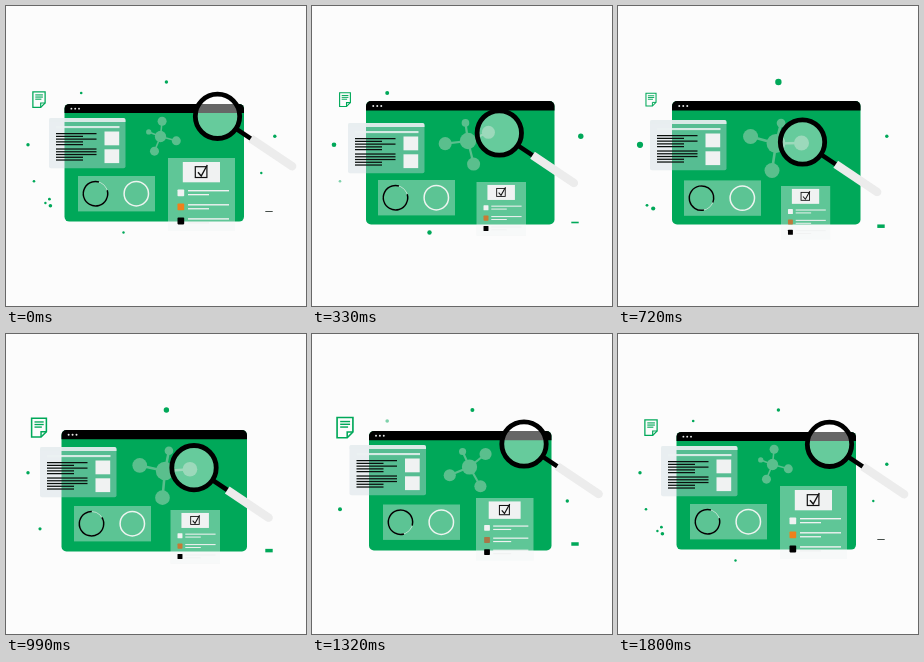
An HTML page with a canvas for the animation above (1830 ms loop, 300 by 300 pixels).

```html
<!DOCTYPE html>
<html lang="en">
<head>
<meta charset="utf-8">
<title>Research dashboard</title>
<style>
html, body { margin: 0; width: 100%; height: 100%; overflow: hidden; background: #fcfcfc; }
canvas { display: block; width: 300px; height: 300px; }
</style>
</head>
<body>
<canvas id="stage"></canvas>
<script>
const LOOP = 1830, STEP = 30;
const TIMES = [0, 330, 720, 990, 1320, 1560, 1800];
const GREEN = '#00a859', PALE = '#f0f2f2';
const canvas = document.getElementById('stage');
const c = canvas.getContext('2d');
const dpr = window.devicePixelRatio || 1;
canvas.width = canvas.height = 300 * dpr;

let now = 0;

// Monotone cubic through six poses; the first pose also closes the loop.
function key(...v) {
  v.push(v[0]);
  const last = TIMES.length - 1;
  if (now >= TIMES[last]) return v[last];
  let i = 0;
  while (now >= TIMES[i + 1]) i++;
  const rise = k => (v[k + 1] - v[k]) / (TIMES[k + 1] - TIMES[k]);
  const slope = k => {
    if (k === 0 || k === last) return 0;
    const a = rise(k - 1), b = rise(k);
    return a * b <= 0 ? 0 : 2 * a * b / (a + b);
  };
  const h = TIMES[i + 1] - TIMES[i], u = (now - TIMES[i]) / h;
  const u2 = u * u, u3 = u2 * u;
  return v[i] * (2 * u3 - 3 * u2 + 1) + v[i + 1] * (3 * u2 - 2 * u3)
    + h * (slope(i) * (u3 - 2 * u2 + u) + slope(i + 1) * (u3 - u2));
}

function rect(x, y, w, h, fill) {
  c.fillStyle = fill;
  c.fillRect(x, y, w, h);
}

function disc(x, y, r, fill) {
  if (r <= 0.05) return;
  c.fillStyle = fill;
  c.beginPath();
  c.arc(x, y, r, 0, Math.PI * 2);
  c.fill();
}

function ring(x, y, r, width, color, from = 0, to = Math.PI * 2) {
  c.strokeStyle = color;
  c.lineWidth = width;
  c.beginPath();
  c.arc(x, y, r, from, to);
  c.stroke();
}

function path(points, width, color, cap = 'butt', close = false) {
  c.strokeStyle = color;
  c.lineWidth = width;
  c.lineCap = cap;
  c.beginPath();
  points.forEach(([x, y]) => c.lineTo(x, y));
  if (close) c.closePath();
  c.stroke();
  c.lineCap = 'butt';
}

function rounded(x, y, w, h, radii, fill) {
  c.fillStyle = fill;
  c.beginPath();
  c.roundRect(x, y, w, h, radii);
  c.fill();
}

function at(x, y, scale, draw) {
  c.save();
  c.translate(x, y);
  c.scale(scale, scale);
  draw();
  c.restore();
}

function drawWindow() {
  const s = key(179.5, 188.5, 188.5, 185.5, 182.5, 180.5) / 188.5;
  at(148.25, 156.75, s, () => {
    rounded(-94.25, -61.75, 188.5, 123.5, 5, GREEN);
    rounded(-94.25, -61.75, 188.5, 9.5, [5, 5, 0, 0], '#000');
    for (let i = 0; i < 3; i++) disc(-87 + i * 4, -56.8, 1, '#e8e8e8');
  });
}

function drawMolecule() {
  const x = key(154.5, 156, 158, 159, 157.5, 156);
  const y = key(130.5, 135, 137.5, 137, 133, 130);
  const s = key(0.6, 0.87, 1, 0.98, 0.81, 0.65);
  const turn = key(-83, -22, 0, -3, -38, -67);
  const color = '#5abf8d';
  at(x, y, s, () => {
    [[-1, 25.5, 7.5], [98.4, 27.3, 7.5], [195.4, 26.4, 7.5], [284, 21, 4.4]].forEach(([deg, d, r]) => {
      const a = (deg + turn) * Math.PI / 180;
      const px = d * Math.cos(a), py = d * Math.sin(a);
      path([[0, 0], [px, py]], 2.6, color);
      disc(px, py, r, color);
    });
    disc(0, 0, 9.4, color);
  });
}

function drawArticle() {
  const x = key(43, 36, 32, 34, 37.5, 41.5);
  const y = key(112, 117, 114, 113, 111, 111);
  at(x, y, 1, () => {
    rounded(0, 0, 76.5, 50.3, 2, 'rgba(206,218,225,.42)');
    rounded(0, 0, 76.5, 4, [2, 2, 0, 0], 'rgba(232,239,240,.9)');
    rect(7, 8, 63.5, 2.1, 'rgba(236,242,242,.85)');
    [15, 30.4].forEach((top, g) => {
      for (let i = 0; i < 5; i++) {
        const long = g ? i < 3 : i % 2 === 0 && i < 4;
        rect(7, top + i * 2.75, long ? 40.5 : 27, 1.25, '#0a0f0d');
      }
    });
    rect(55.5, 13.5, 14.7, 13.8, PALE);
    rect(55.5, 31.3, 14.7, 13.8, PALE);
  });
}

function drawCharts() {
  const x = key(72, 66, 66, 68, 71, 72);
  const y = key(170, 174, 174.4, 172, 170.5, 170);
  const gap = key(-45, -45, 50, -60, 45, -45) * Math.PI / 180;
  at(x, y, 1, () => {
    rect(0, 0, 77, 35.4, 'rgba(230,238,236,.4)');
    ring(17.5, 17.7, 12.2, 1, '#b9e0cd');
    ring(17.5, 17.7, 12.2, 1.5, '#000', gap + 0.5, gap + Math.PI * 2 - 0.5);
    ring(58.3, 17.7, 12.2, 1.5, '#eef4f0');
  });
}

function drawChecklist() {
  const x = key(162, 164.5, 163, 164.5, 164, 162.5);
  const y = key(152, 176, 180, 176, 164, 156);
  const s = key(67, 49.5, 49.2, 49.5, 57.5, 64.3) / 67;
  const dull = key(0, 0.55, 0.7, 0.6, 1, 0.75);
  const orange = `rgb(${240 - 72 * dull},${128 - 10 * dull},${27 + 45 * dull})`;
  at(x, y, s, () => {
    rect(0, 0, 67, 73, 'rgba(238,242,242,.4)');
    rect(14.8, 4, 37.2, 20.3, PALE);
    c.strokeStyle = '#111';
    c.lineWidth = 1.2;
    c.strokeRect(27.3, 8.7, 11.6, 10.8);
    path([[30, 14.3], [33.2, 18], [39.3, 7]], 1.4, '#111');
    [PALE, orange, '#000'].forEach((fill, i) => {
      const top = 31.4 + i * 14.1;
      rounded(9.5, top, 6.7, 6.8, 0.8, fill);
      rect(20, top + 0.6, 41, 1.4, PALE);
      rect(20, top + 4.6, 21, 1.3, PALE);
    });
  });
}

function drawLens() {
  const x = key(211.5, 187.3, 184.5, 188, 212, 211.5);
  const y = key(110.3, 127, 136, 133.7, 110, 110.2);
  at(x, y, 1, () => {
    disc(0, 0, 21, 'rgba(255,255,255,.4)');
    ring(0, 0, 22.2, 4.8, '#000');
    c.rotate(33.8 * Math.PI / 180);
    path([[23, 0], [41, 0]], 4.6, '#000');
    rounded(40, -4.2, 54, 8.4, [0, 4.2, 4.2, 0], '#ececec');
  });
}

function drawNote() {
  const s = key(17, 15, 14, 20.5, 22, 19.6) / 20;
  at(33, 93.6, s, () => {
    path([[-7.2, -9.2], [7.2, -9.2], [7.2, 4], [2, 9.2], [-7.2, 9.2]], 1.5, GREEN, 'butt', true);
    path([[7.2, 4], [2, 4], [2, 9.2]], 1.4, GREEN);
    [[-5.5, 4.6], [-3, 4.6], [-0.5, 2.8]].forEach(([y, end]) =>
      path([[-4.4, y], [end, y]], 1.3, GREEN));
  });
}

function drawDots() {
  const dot = (x, y, r, alpha = 1) => {
    c.globalAlpha = alpha;
    disc(x, y, r, GREEN);
    c.globalAlpha = 1;
  };
  dot(160.4, 76, key(1.7, 0, 3.2, 2.7, 2, 1.8));
  dot(75.2, 87, key(1.3, 2, 0, 0, 1.8, 1.8), key(1, 1, 0, 0, 0.5, 1));
  dot(22, 138.8, key(1.7, 2.3, 3.1, 1.7, 0, 0));
  dot(28, 175.3, key(1.3, 1.3, 0, 0, 2, 1.7), key(1, 0.5, 0, 0, 1, 1));
  dot(117.5, 226.5, key(1.2, 2.2, 0, 0, 0, 0));
  dot(268.8, 130.2, key(1.7, 2.7, 1.7, 0, 0, 2.8));
  dot(255.3, 167, key(1.2, 0, 0, 0, 1.7, 1.4));
  // small cluster at the lower left
  dot(43.4, 193.2, key(1.4, 0, 0, 0, 0, 0));
  dot(39.4, 197, key(1.2, 0, 0, 0, 0, 0));
  dot(key(44.4, 42, 42, 42, 42, 42), key(199.7, 201, 201, 201, 201, 201.3),
    key(1.8, 0, 0, 0, 0, 1.8), key(1, 0, 0, 0, 0, 0.6));
  dot(41, 194.7, key(0, 0, 0, 0, 0, 1.3), 0.4);
  dot(29, 199.3, key(0, 0, 1.4, 0, 0, 0));
  dot(35.2, 202.5, key(0, 0, 2.1, 0, 0, 0));
  dot(34, 194.8, key(0, 0, 0, 1.6, 0, 0));
}

function drawDash() {
  const y = key(205.5, 216.5, 220.2, 216.6, 210, 206.6);
  const h = key(0.9, 1.6, 3.5, 3.5, 3.5, 2.2);
  const dark = key(1, 0, 0, 0, 0, 0);
  rect(259.3, y - h / 2, 7.4, h, `rgb(${50 * dark},${168 - 110 * dark},${89 - 35 * dark})`);
}

function frame(ms) {
  now = Math.floor((ms % LOOP) / STEP) * STEP;
  c.setTransform(dpr, 0, 0, dpr, 0, 0);
  rect(0, 0, 300, 300, '#fcfcfc');
  drawDots();
  drawDash();
  drawNote();
  drawWindow();
  drawMolecule();
  drawArticle();
  drawCharts();
  drawChecklist();
  drawLens();
}

function tick() {
  frame(performance.now());
  requestAnimationFrame(tick);
}
tick();
</script>
</body>
</html>
```
